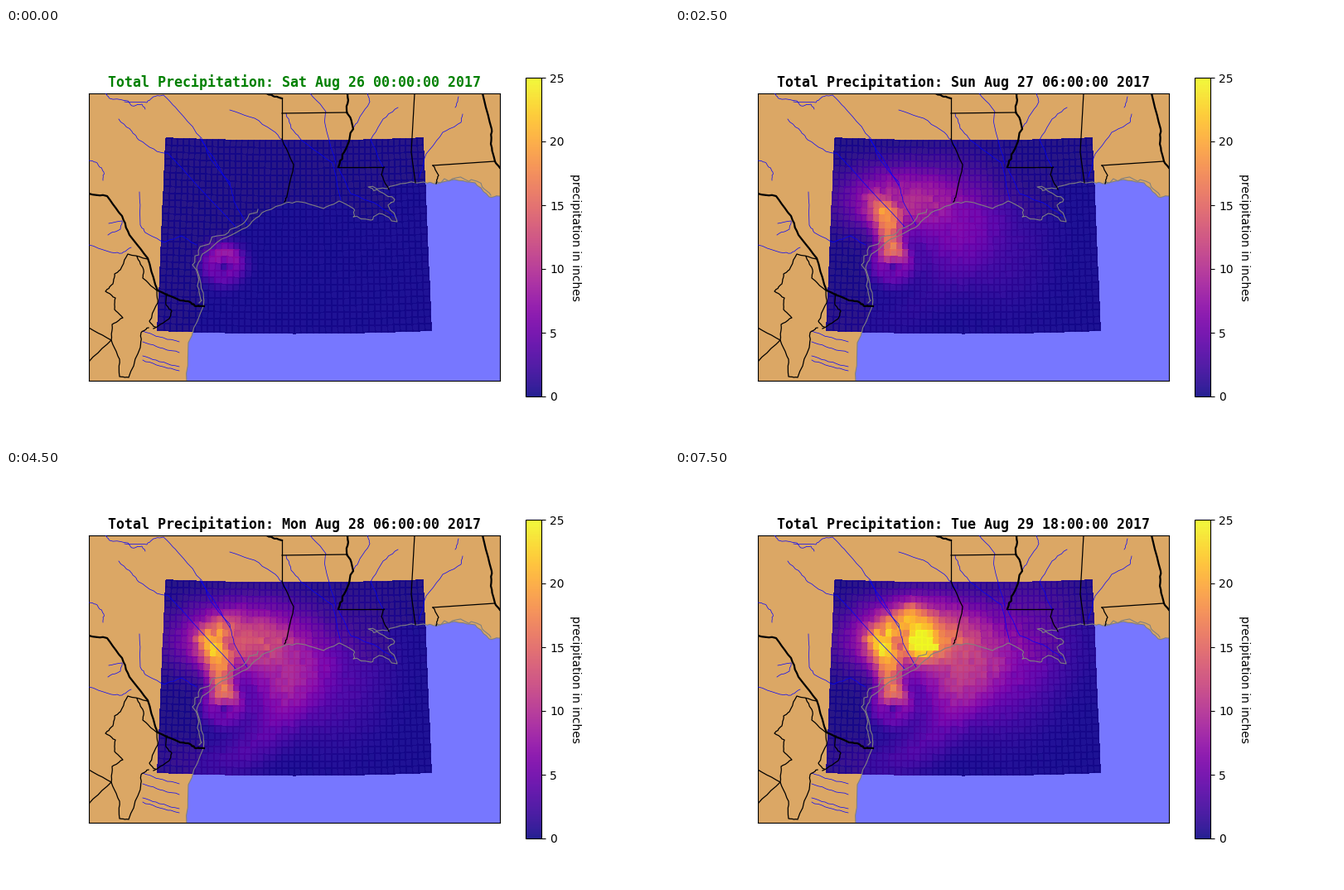
These frames come from a looping animation (800 px wide and 500 px high, 8 s). A matplotlib script:

```python
import numpy as np
import matplotlib.pyplot as plt
from matplotlib.animation import FuncAnimation

FRAMES, STEP_MS = 16, 500
COLS, ROWS = 44, 28
LAND, SEA = "#dba765", "#7777ff"
RIVER = dict(color="blue", lw=0.5, zorder=3)
COAST = dict(color="gray", lw=0.8, zorder=4)
STATE = dict(color="black", lw=0.9, zorder=5)
BORDER = dict(color="black", lw=1.6, zorder=5)

rng = np.random.default_rng(26)
fig = plt.figure(figsize=(8, 5), dpi=100, facecolor="white")
ax = fig.add_subplot()
ax.set(xlim=(100, 596), ylim=(426, 79), xticks=[], yticks=[], aspect="equal")
ax.set_facecolor(SEA)


# Map: a few key points per line, made natural by seeded roughness
def rough(points, amp, parts=5):
    p = np.array(points, float)
    s = np.arange((len(p) - 1) * parts + 1) / parts
    q = np.column_stack([np.interp(s, range(len(p)), c) for c in p.T])
    shake = rng.uniform(-amp, amp, q.shape)
    shake[::parts] = 0
    return q + shake


def line(style, *points, amp=0.7):
    ax.plot(*rough(points, amp).T, **style)


def river(*points):
    line(RIVER, *points)


west = [(218, 426), (220, 380), (238, 336), (238, 320), (230, 290), (237, 273),
        (260, 255), (290, 241), (309, 223), (338, 211), (355, 210), (383, 218),
        (402, 209)]
delta = [(402, 209), (419, 218), (419, 228), (440, 232), (450, 224), (472, 234),
         (461, 214), (469, 207), (452, 198), (437, 192), (460, 194), (476, 188),
         (504, 186)]
east = [(504, 186), (516, 188), (541, 183), (566, 187), (583, 204), (597, 203)]
shore = np.vstack([rough(west, 0.9), rough(delta, 1.8, 4), rough(east, 0.9)])
ax.fill(*np.vstack([shore, [(597, 78), (99, 78), (99, 427)]]).T,
        color=LAND, lw=0, zorder=1)
ax.plot(*shore.T, **COAST)
bays = np.array(west[2:9]) - (5, 4)
line(COAST, *bays, amp=3.2)
line(COAST, *(np.array(east[1:5]) + (2, -2)), amp=2)

river((120, 79), (125, 85), (147, 88), (152, 94), (164, 92), (168, 98))
river((143, 89), (170, 90), (178, 83), (190, 81), (208, 100), (236, 133),
      (248, 160), (270, 186), (275, 209), (291, 238))
river((136, 110), (152, 125), (160, 135), (182, 149), (195, 151), (278, 241))
river((234, 133), (251, 157), (270, 190))
river((270, 99), (300, 109), (325, 126), (339, 143))
river((338, 103), (344, 121), (357, 136), (394, 163), (404, 208))
river((367, 79), (386, 101), (385, 116), (398, 164))
river((436, 79), (439, 89), (425, 112), (418, 122))
river((401, 168), (416, 200), (444, 211), (472, 230))
river((473, 96), (455, 110), (440, 135), (455, 168))
river((546, 83), (542, 96))
river((551, 104), (549, 114), (527, 126), (507, 152), (499, 180))
river((100, 160), (110, 163), (118, 174), (117, 184))
river((161, 198), (162, 238), (168, 247), (191, 259), (212, 251), (230, 262))
river((123, 250), (138, 243), (140, 233), (124, 236))
river((100, 262), (127, 271), (140, 272), (151, 265))
for y in (366, 379, 396, 401):
    river((165, y), (185, y + 7), (209, y + 13))

line(BORDER, (100, 200), (122, 203), (140, 227), (149, 250), (171, 278),
     (183, 317), (210, 329), (222, 331), (230, 336), (239, 336))
line(BORDER, (314, 79), (322, 82), (333, 85), amp=0.4)
line(STATE, (333, 85), (333, 134), amp=0)
line(STATE, (333, 134), (347, 165), (339, 203), (336, 210))
line(STATE, (333, 103), (412, 102), amp=0)
line(BORDER, (412, 79), (411, 98), (419, 122), (408, 150), (401, 168), amp=1.4)
line(STATE, (401, 168), (456, 168), amp=0)
line(STATE, (456, 168), (453, 177), (462, 195))
line(STATE, (493, 79), (489, 150), (494, 187), amp=0)
line(STATE, (590, 161), (515, 166), amp=0)
line(STATE, (515, 166), (522, 178), (519, 188))
line(BORDER, (575, 79), (586, 122), (585, 140), (590, 161), (597, 170), amp=0.5)
line(STATE, (171, 279), (147, 273), (138, 292), (131, 297), (129, 309),
     (120, 318), (132, 326), (131, 340), (141, 350), (128, 358), (127, 377),
     (137, 400), (137, 421), (148, 422), (162, 386), (163, 368), (172, 362))
line(STATE, (100, 362), (127, 377), (100, 403), amp=0.5)
line(STATE, (158, 276), (166, 292), (165, 302), (182, 317), (183, 332),
     (173, 354), (180, 361))
line(STATE, (194, 321), (193, 334), (200, 342), (197, 351), (178, 363))


# Rain grid, fanned out towards the south
def project(u, v):
    return 348 + (u - 0.5) * (310 + 20 * v), 133 + 232 * v + 14 * u * (1 - u)


u, v = np.meshgrid(np.linspace(0, 1, COLS + 1), np.linspace(0, 1, ROWS + 1))
CX, CY = project(u[:-1, :-1] + 0.5 / COLS, v[:-1, :-1] + 0.5 / ROWS)
grain = 1 + 0.06 * rng.standard_normal(CX.shape)


def ring(x, y, radius, width):
    """Ring strength per cell, and the cell's bearing from its centre."""
    dx, dy = CX - x, CY - y
    return np.exp(-((np.hypot(dx, dy) - radius) / width) ** 2), np.arctan2(dy, dx)


def sweep(step, t, x, y, rate, sx, sy):
    """Rain left behind by a cloud that drifts between key places."""
    total = np.zeros_like(CX)
    for s in range(1, step + 1):
        cx, cy, r = (np.interp(s, t, k) for k in (x, y, rate))
        d = (((CX - cx) / sx) ** 2 + ((CY - cy) / sy) ** 2) / 2
        total += r * np.exp(-d ** 1.3)
    return total


eye, bearing = ring(263, 287, 14, 13)
landfall = 6 * eye * (1 - 0.3 * np.sin(bearing))
arm, bearing = ring(235, 247, 107, 24)
tail = 3 * arm * np.exp(-((bearing - np.pi / 4) / 0.9) ** 2)


def rain(step):
    core = sweep(step, [1, 3, 5, 8, 10, 11.5, 13, 15],
                 [262, 256, 241, 252, 280, 294, 301, 301],
                 [266, 232, 210, 198, 176, 172, 211, 212],
                 [7, 7, 2.5, 2.5, 3, 3, 4.5, 4.5], 12, 12)
    halo = sweep(step, [1, 3, 4, 8, 15], [262, 266, 268, 285, 315],
                 [215, 205, 200, 188, 190], [2, 2, 0.8, 0.8, 0.8], 45, 28)
    gulf = sweep(step, [1, 3, 8, 12, 15], [330, 340, 335, 380, 400],
                 [228, 232, 250, 220, 215], [1, 1, 0.5, 0.5, 0.5], 38, 45)
    far = sweep(step, [1, 5, 10], [392, 395, 440], [265, 260, 200],
                [0.3, 0.3, 0.3], 40, 50)
    band = tail * np.clip((step - 4) / 4, 0, 1)
    return np.clip((0.3 + landfall + core + halo + gulf + far + band) * grain, 0, 25)


mesh = ax.pcolormesh(*project(u, v), rain(0), cmap="plasma", vmin=0, vmax=25,
                     alpha=0.9, edgecolors="face", linewidth=0.3, zorder=2)
bar = fig.colorbar(mesh, ax=ax, ticks=range(0, 26, 5))
bar.set_label("precipitation in inches", rotation=270, labelpad=15)
title = ax.set_title("", family="DejaVu Sans Mono", weight="bold", fontsize=12)
totals = [rain(step) for step in range(FRAMES)]


def update(step):
    day, quarter = divmod(step, 4)
    name = ("Sat", "Sun", "Mon", "Tue")[day]
    title.set_text(f"Total Precipitation: {name} Aug {26 + day} {quarter * 6:02d}:00:00 2017")
    title.set_color("black" if step else "green")
    mesh.set_array(totals[step])
    return mesh, title


anim = FuncAnimation(fig, update, frames=FRAMES, interval=STEP_MS, repeat=True)
plt.show()
```
